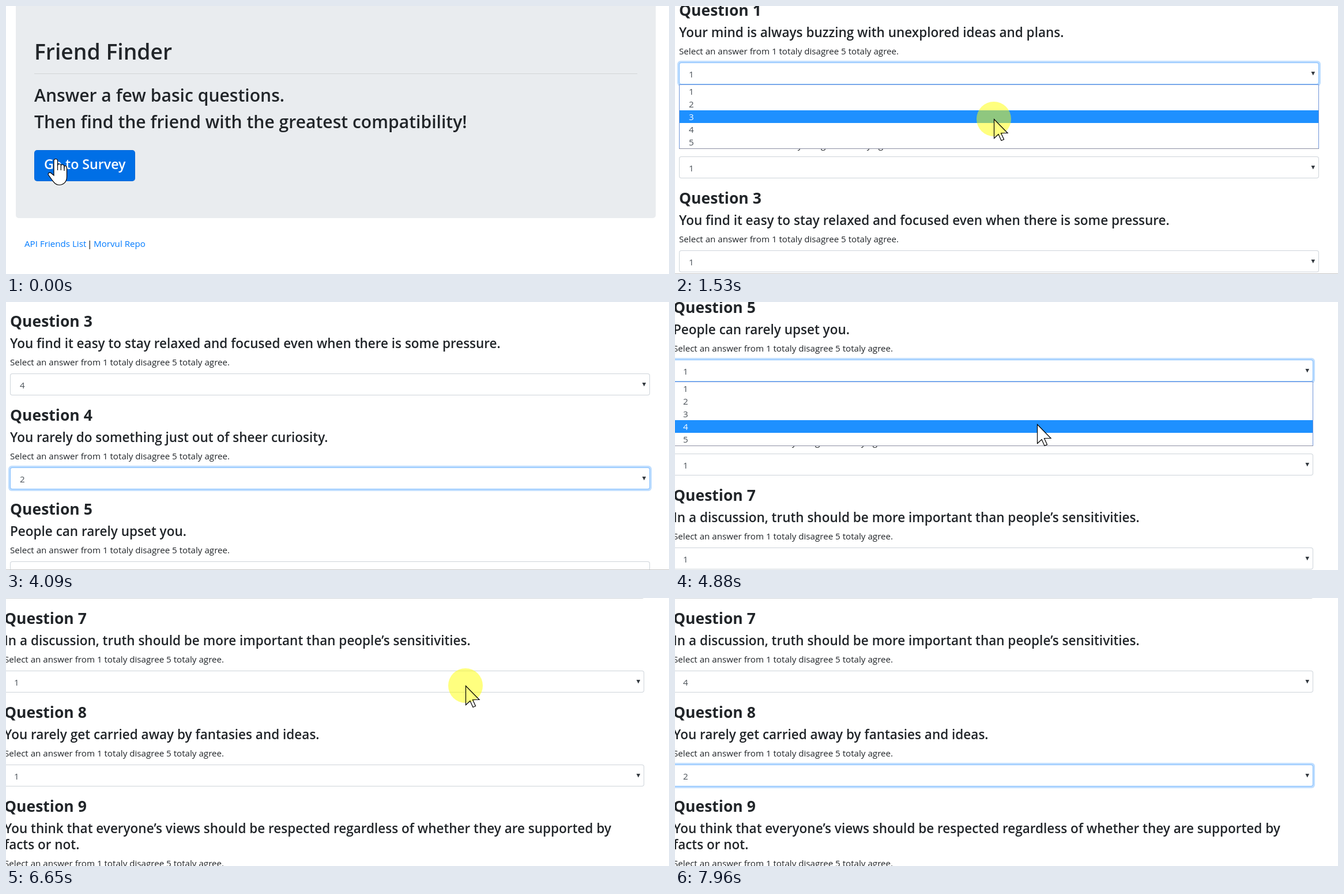
These frames come from a looping animation (1150x465 px, 8000 ms). An HTML page with a canvas:

```html
<!DOCTYPE html>
<html lang="en">
<head>
<meta charset="utf-8">
<title>Friend survey</title>
<style>
  html, body { margin: 0; height: 100%; overflow: hidden; background: #fff; }
  canvas { display: block; }
</style>
</head>
<body>
<canvas id="stage" width="1150" height="465"></canvas>
<script>
const ctx = document.getElementById('stage').getContext('2d');
const LOOP = 8000, LOADED = 330, PRESS = 100, TRAVEL = 220;
const INK = '#212529', FIELD_INK = '#495057', LINK = '#007bff';
const PITCH = 163, ROW = 22, FIELD_TOP = 81, LIST_TOP = 119;
const HINT = 'Select an answer from 1 totaly disagree 5 totaly agree.';

// down: press on the field, close: answer taken, x: where the pointer works
const ask = (title, down = Infinity, close = Infinity, answer = 1, x = 0) =>
  ({ lines: title.split('\n'), down, close, answer, x });
const QUESTIONS = [
  ask('Your mind is always buzzing with unexplored ideas and plans.', 1360, 1650, 3, 553),
  ask('You rely more on your experience than your imagination.', 2080, 2400, 4, 570),
  ask('You find it easy to stay relaxed and focused even when there is some pressure.', 2630, 3270, 4, 746),
  ask('You rarely do something just out of sheer curiosity.', 3480, 3940, 2, 640),
  ask('People can rarely upset you.', 4680, 5070, 4, 628),
  ask('It is often difficult for you to relate to other people’s feelings.', 5570, 5980, 3, 590),
  ask('In a discussion, truth should be more important than people’s sensitivities.', 6650, 7400, 4, 797),
  ask('You rarely get carried away by fantasies and ideas.', 7620, 7960, 2, 640),
  ask('You think that everyone’s views should be respected regardless of whether they are supported by\nfacts or not.')
];

const ramp = (t, a, b) => Math.min(1, Math.max(0, (t - a) / (b - a)));
const within = (t, a, b) => t >= a && t < b;
const easeOut = p => 1 - (1 - p) ** 3;

// Motion is seen at a steady refresh rate
const refresh = t => Math.max(0, Math.floor((t - 40) / 93) * 93 + 40);

// Left edge of the form and baseline of the first question
function page(t) {
  const first = ramp(t, 1000, 1156), third = ramp(t, 4170, 4500);
  return {
    x: Math.round(17 - 10 * first - 10 * third),
    y: Math.round(367 - 350 * (first + third) - 300 * (ramp(t, 2400, 2600) + ramp(t, 5980, 6330)))
  };
}

function move(a, b, p) {
  const mix = k => Math.round(a[k] + (b[k] - a[k]) * easeOut(p));
  return { x: mix('x'), y: mix('y') };
}

// The pointer goes to each field, then down to the chosen row
function pointerAt(t) {
  let spot = { x: 83, y: 265 }, free = LOADED;
  QUESTIONS.forEach(({ down, close, answer, x }, i) => {
    if (t < free || down === Infinity) return;
    const top = page(down).y + PITCH * i;
    const field = { x, y: top + FIELD_TOP + 26 };
    const row = { x, y: top + LIST_TOP + ROW * (answer - .5) + 5 };
    spot = t < down + PRESS
      ? move(spot, field, ramp(t, free, Math.min(down, free + TRAVEL)))
      : move(field, row, ramp(t, down + PRESS, close - 120));
    free = close;
  });
  return spot;
}

function text(str, x, y, size = 15.16, weight = 400, color = INK) {
  ctx.font = `${weight} ${size}px "Open Sans", "Noto Sans", sans-serif`;
  ctx.fillStyle = color;
  ctx.fillText(str, x, y);
}

function rect(x, y, w, h, color) {
  ctx.fillStyle = color;
  ctx.fillRect(x, y, w, h);
}

function round(x, y, w, h, r, color) {
  ctx.beginPath();
  ctx.roundRect(x, y, w, h, r);
  ctx.fillStyle = color;
  ctx.fill();
}

function field(x, y, value, focus, indent = 17) {
  if (focus) round(x - 3, y - 3, 1116, 44, 6, '#bfdeff');
  round(x, y, 1110, 38, 4, focus ? '#80bdff' : '#ced4da');
  round(x + 1, y + 1, 1108, 36, 3, '#fff');
  text(value, x + indent, y + 26, 15.16, 400, FIELD_INK);
}

function home() {
  round(17, -20, 1110, 388, 5, '#e9ecef');
  text('Friend Finder', 49, 93, 37.3, 600);
  rect(49, 117, 1046, 1, '#d2d5d7');
  text('Answer a few basic questions.', 49, 166, 30.1, 600);
  text('Then find the friend with the greatest compatibility!', 49, 212, 30.1, 600);
  round(49, 250, 175, 54, 5, '#0067d8');
  round(50, 251, 173, 52, 4, '#006fe6');
  text('Go to Survey', 66, 283, 23.2, 600, '#fff');
  text('API Friends List', 32, 418, 15.16, 400, LINK);
  text('|', 141, 418, 15.16, 400, '#000');
  text('Morvul Repo', 152, 418, 15.16, 400, LINK);
}

function about(x, y, t) {
  text('Survey Questions', x, y - 274, 37.3, 600);
  rect(x, y - 250, 1110, 1, '#e5e5e5');
  text('About You', x, y - 197, 26.5, 700);
  text('Name (Required)', x, y - 164);
  field(x, y - 152, t < 750 ? '' : 'Test', within(t, 430, QUESTIONS[0].down), 13);
  text('Link to Photo Image (Required)', x, y - 92);
  field(x, y - 82, '', false);
}

function question({ lines, down, close, answer }, i, x, y, t) {
  const blur = QUESTIONS[i + 1]?.down;
  text(`Question ${i + 1}`, x, y, 26.5, 700);
  lines.forEach((line, n) => text(line, x, y + 37 + 28 * n, 22.5, 600));
  y += 28 * (lines.length - 1);
  text(HINT, x, y + 67);
  field(x, y + FIELD_TOP, String(t < close ? 1 : answer), within(t, down + PRESS, blur));
  ctx.fillStyle = '#343a40';
  ctx.fill(new Path2D(`M${x + 1096.5} ${y + 97}h6.6l-3.3 6.4z`));
}

function list(x, y, pointerY) {
  const row = Math.floor((pointerY - y - 1) / ROW), hover = within(row, 0, 5) ? row : 0;
  rect(x, y, 1110, 112, '#6f94d8');
  rect(x, y + 111, 1110, 1, '#8c8fa3');
  rect(x + 1, y + 1, 1108, 110, '#fff');
  rect(x + 1, y + 1 + ROW * hover, 1108, ROW, '#1e90ff');
  for (let i = 0; i < 5; i++)
    text(String(i + 1), x + 17, y + 18 + ROW * i, 15.16, 400, i === hover ? '#fff' : FIELD_INK);
}

const ARROW = new Path2D('M.5 .5V33.5L8 26.5L13 37.5L17.5 35.5L12.5 24.5H24Z');
const HAND = new Path2D(
  'M0 20V3.5Q0 .5 3.3 .5Q6.5 .5 6.5 3.5V12C7 8 12 8 12.5 12C13 9 17.5 9 18 14' +
  'C18.5 11 22.5 12 22.5 17V31C22.5 40 17 45.5 9 45.5C3 45.5 0 41 -3 37' +
  'L-9.5 28C-11 24 -6 23 -3.5 26L0 29Z');
const KNUCKLES = new Path2D('M6.5 11V20M12.3 12V20M18 14V21');

function pointer({ x, y }, pressed, hand) {
  const shape = hand ? HAND : ARROW;
  ctx.save();
  ctx.translate(x, y);
  ctx.fillStyle = '#fff';
  ctx.fill(shape);
  if (pressed) {
    ctx.beginPath();
    ctx.arc(0, 0, 30, 0, 7);
    ctx.fillStyle = 'rgba(255,255,0,.5)';
    ctx.fill();
  }
  ctx.strokeStyle = '#000';
  ctx.lineWidth = 1.2;
  ctx.stroke(shape);
  if (hand) ctx.stroke(KNUCKLES);
  ctx.restore();
}

function draw(t) {
  const seen = refresh(t), { x, y } = page(seen), spot = pointerAt(seen), atHome = t < LOADED;
  rect(0, 0, 1150, 465, '#fff');
  if (atHome) {
    home();
  } else {
    about(x, y, t);
    QUESTIONS.forEach((q, i) => question(q, i, x, y + PITCH * i, t));
    const open = QUESTIONS.findIndex(q => within(t, q.down + PRESS, q.close));
    if (open >= 0) list(x, y + PITCH * open + LIST_TOP, spot.y);
    if (within(t, 1200, 4220)) rect(0, 464, 1150, 1, '#c4c4c4');
  }
  const pressed = atHome ? t >= 130 : QUESTIONS.some(({ down, close }) =>
    within(t, down, down + PRESS) || within(t, close - 120, close));
  const away = within(t, 530, 1200) || within(t, 4090, 4420) || t >= 7960;
  if (!away) pointer(spot, pressed, atHome);
}

const start = performance.now();
function loop() {
  draw((performance.now() - start) % LOOP);
  requestAnimationFrame(loop);
}
loop();
</script>
</body>
</html>
```
